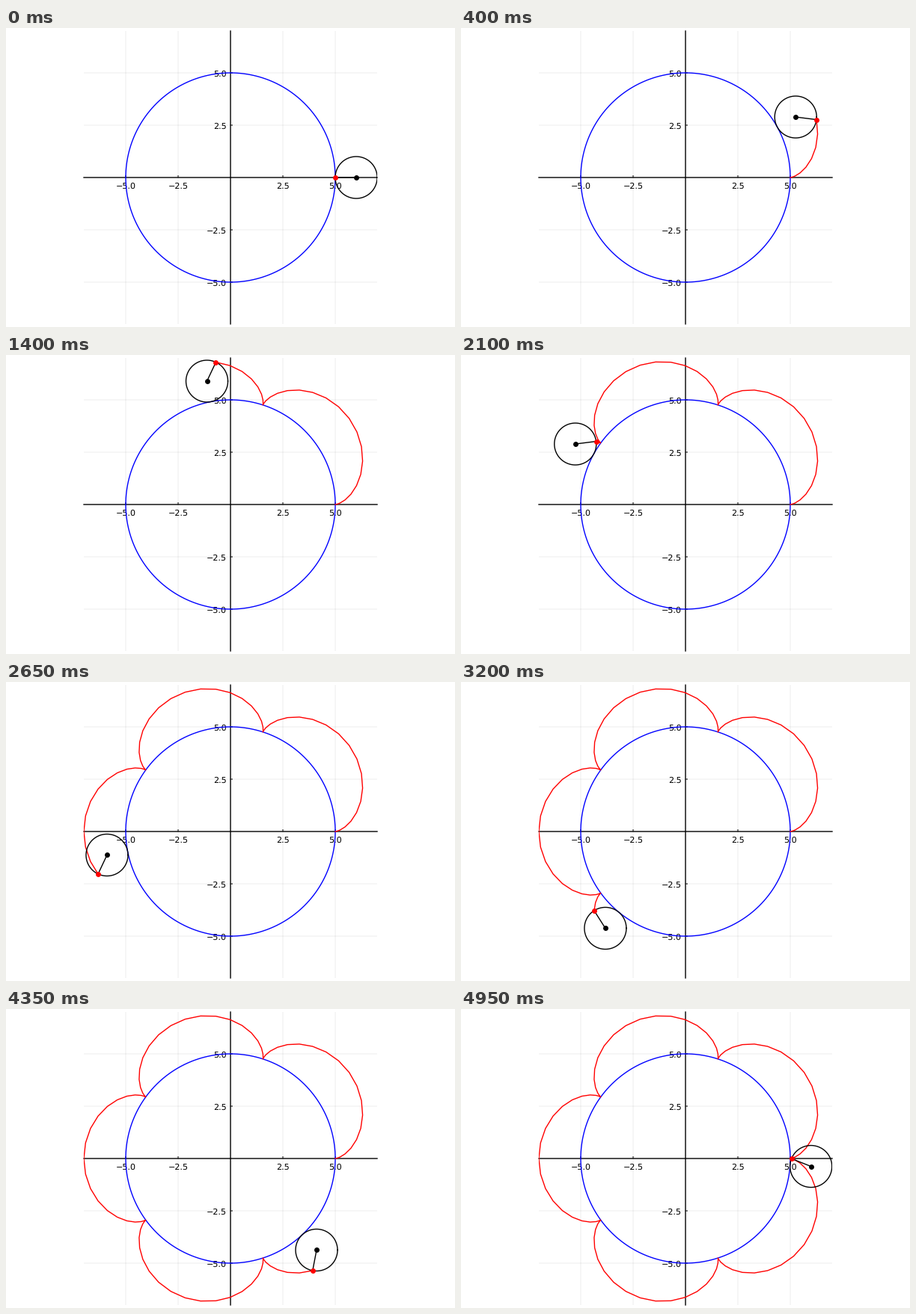
Recreate the animation shown at these times as a matplotlib script. Size 600x400 px, loop 5 s.

```python
import numpy as np
import matplotlib.pyplot as plt
from matplotlib.animation import FuncAnimation

FRAMES = 100
INTERVAL = 50
BIG, SMALL = 5, 1
LIMIT = 7
PX = 1 / 28  # one pixel in data units

plt.rcParams.update({
    "font.family": "DejaVu Sans",
    "font.size": 8,
    "text.hinting": "none",
    "path.simplify": False,
    "lines.linewidth": 1,
})

fig = plt.figure(figsize=(6, 4), dpi=100, facecolor="white")
ax = fig.add_axes([104 / 600, 4 / 400, 392 / 600, 392 / 400])
ax.set(xlim=(-LIMIT, LIMIT), ylim=(-LIMIT, LIMIT))
ax.axis("off")


def line(x, y, color="black", **style):
    return ax.plot(x, y, color=color, snap=False, **style)[0]


def draw_axes():
    ends = [-LIMIT, LIMIT]
    ticks = [-5.0, -2.5, 2.5, 5.0]
    for t in ticks:
        for x, y in ((ends, [t, t]), ([t, t], ends)):
            line(x, y, lw=0.5, alpha=0.1)
    for x, y in ((ends, [0, 0]), ([0, 0], ends)):
        line(x, y, clip_on=False, solid_capstyle="projecting")
    for t in ticks:
        line([t, t], [0, 3 * PX], lw=0.7, solid_capstyle="butt")
        line([0, 3 * PX], [t, t], lw=0.7, solid_capstyle="butt")
        label = f"{t:.1f}".replace("-", "\u2212")
        ax.text(t, -15 * PX, label, ha="center", va="baseline", zorder=1)
        ax.text(-5 * PX, t - 5 * PX, label, ha="right", va="baseline", zorder=1)


draw_axes()

turn = np.linspace(0, 2 * np.pi, 201)
ring_x, ring_y = np.cos(turn), np.sin(turn)

theta = 2 * np.pi * np.arange(FRAMES) / FRAMES
reach = BIG + SMALL
ratio = reach / SMALL
hub_x, hub_y = reach * np.cos(theta), reach * np.sin(theta)
pen_x = hub_x - SMALL * np.cos(ratio * theta)
pen_y = hub_y - SMALL * np.sin(ratio * theta)

line(BIG * ring_x, BIG * ring_y, "blue")
trail = line([], [], "red")
wheel = line([], [])
spoke = line([], [])
hub = line([], [], marker="o", ms=5, mew=0)
pen = line([], [], "red", marker="o", ms=5, mew=0)


def update(i):
    trail.set_data(pen_x[:i + 1], pen_y[:i + 1])
    wheel.set_data(hub_x[i] + SMALL * ring_x, hub_y[i] + SMALL * ring_y)
    spoke.set_data([hub_x[i], pen_x[i]], [hub_y[i], pen_y[i]])
    hub.set_data([hub_x[i]], [hub_y[i]])
    pen.set_data([pen_x[i]], [pen_y[i]])
    return trail, wheel, spoke, hub, pen


anim = FuncAnimation(fig, update, frames=FRAMES, interval=INTERVAL,
                     repeat=True, repeat_delay=0)
plt.show()
```
